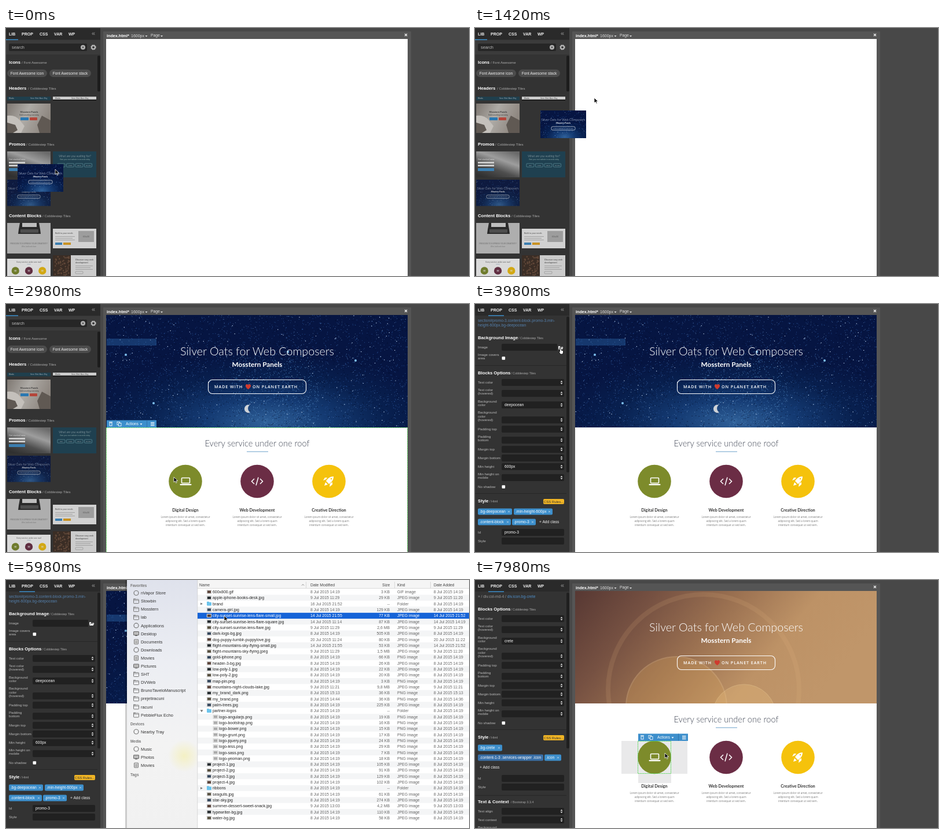
An HTML page that plays this animation: 800 by 430 pixels, repeating every 8000 ms.

```html
<!DOCTYPE html>
<html lang="en">
<head>
<meta charset="utf-8">
<title>Page builder</title>
<style>
html, body { margin: 0; width: 100%; height: 100%; overflow: hidden; background: #484848 }
svg { display: block; font-family: "Liberation Sans", Arial, sans-serif }
text { white-space: pre }
.lato { font-family: Lato, sans-serif }
.open { font-family: "Open Sans", sans-serif }
.b { font-weight: bold }
.l { font-weight: 300 }
.m { text-anchor: middle }
.e { text-anchor: end }
</style>
</head>
<body>
<svg id="stage" width="800" height="430" viewBox="0 0 800 430"></svg>
<script>
// Shape helpers; T takes the vertical middle of the capitals.
const R = (x, y, w, h, f, r = 0, a = '') => `<rect x="${x}" y="${y}" width="${w}" height="${h}" fill="${f}" rx="${r}" ${a}/>`;
const C = (x, y, r, f, a = '') => `<circle cx="${x}" cy="${y}" r="${r}" fill="${f}" ${a}/>`;
const P = (d, f, a = '') => `<path d="${d}" fill="${f}" ${a}/>`;
const L = (d, s, w = 1) => P(d, 'none', `stroke="${s}" stroke-width="${w}"`);
const T = (x, y, s, z, f = '#ddd', c = '', a = '') => `<text x="${x}" y="${y + z * .36}" font-size="${z}" fill="${f}" class="${c}" ${a}>${s}</text>`;
const G = (id, ...parts) => `<g id="${id}">${parts.join('')}</g>`;
const use = (id, x, y, s) => `<use href="#${id}" transform="translate(${x} ${y}) scale(${s})"/>`;
const caret = (x, y, f = '#ddd') => P(`M${x} ${y}h4l-2 2.5z`, f);

let seed = 11;
const rnd = () => (seed = seed * 16807 % 2147483647) / 2147483647;
const stars = (n, x, y, w, h, s) => Array.from({ length: n }, () =>
  `M${(x + rnd() * (w - s)).toFixed(1)} ${(y + rnd() * (h - s)).toFixed(1)}h${s}v${s}h-${s}z`).join('');
const gradient = (id, colors, a = 'x2="1" y2=".3"', kind = 'linear') => `<${kind}Gradient id="${id}" ${a}>` +
  colors.map((c, i) => `<stop offset="${i / (colors.length - 1)}" stop-color="${c}"/>`).join('') + `</${kind}Gradient>`;

const KIT = 'Cobblestep Tiles', BRAND = 'Mosstern Panels', SLOGAN = 'Silver Oats for Web Composers';
const OLIVE = '#7d8b2b', WINE = '#6b2d45', YELLOW = '#f5c20c', BLUE = '#3d8fcc';

const defs = '<defs>' +
  gradient('skyFill', ['#2f6098', '#143a72', '#08204f', '#061542'], 'cx=".53" cy=".95" r=".6"', 'radial') +
  gradient('sunsetFill', ['#573833', '#765142', '#9b7151', '#bd9266', '#c0966a']) +
  gradient('deskFill', ['#8f8780', '#c9c5bf', '#a39a92']) +
  gradient('waterFill', ['#777', '#b5b5b5', '#555', '#303030'], 'x1=".8" x2=".2" y2="1"') +
  gradient('sideFill', ['#dfe2ec', '#eceef3', '#f3f3f3', '#f1f1f1'], 'x2="0" y2="1"') +
  gradient('glowFill', ['#f4f0c4', '#f4f0c400'], '', 'radial') +
  G('starThumb', R(0, 0, 79, 48, 'url(#skyFill)'), P(stars(150, 0, 0, 79, 48, .7), '#2f66b0'), P(stars(35, 0, 0, 79, 48, .7), '#a4c4ea'),
    T(39.5, 16, SLOGAN, 5.6, '#dce8f6', 'lato l m'), T(39.5, 22, BRAND, 3.4, '#fff', 'lato b m'),
    R(19, 28, 41, 6, 'none', 2, 'stroke="#fff" stroke-width=".6"'), T(39.5, 31, 'MADE WITH ♥ ON PLANET EARTH', 2.2, '#fff', 'm')) +
  G('serviceThumb', R(0, 0, 79, 50, '#fff'), T(39.5, 6, 'Every service under one roof', 3.6, '#666', 'lato m'), R(36, 10, 7, .5, '#79b'),
    ...[[15, OLIVE, 'Digital Design'], [39.5, WINE, 'Web Development'], [64, YELLOW, 'Creative Direction']].map(([x, c, s]) =>
      C(x, 22, 7, c) + R(x - 2, 20.5, 4, 3, '#fff8') + T(x, 35, s, 2.4, '#333', 'm') +
      [39, 41.5, 44].map(y => R(x - 8, y, 16, .6, '#aaa')).join(''))) + '</defs>';

const base = R(0, 0, 800, 430, '#484848') + R(168, 6, 532, 424, '#555') + R(0, 0, 163, 430, '#333') + R(0, 0, 163, 20, '#2a2a2a') +
  [['LIB', 5], ['PROP', 27], ['CSS', 58], ['VAR', 83], ['WP', 108]].map(([s, x]) => T(x, 10, s, 7, '#eee', 'b')).join('') + T(148, 9, '«', 11, '#999');
const heading = (y, s, note, x, z = 5.4) => T(5, y - .5, s, 7.7, '#fff', 'b') + T(x, y, '/ ' + note, z, '#aaa');

// Library panel
const pill = (x, w, s) => R(x, 72, w, 13, '#4c4c4c', 6.5) + T(x + w / 2, 78.5, s, 6.6, '#eee', 'm');
const bars = (x, y, n, w, f) => Array.from({ length: n }, (_, i) => R(x, y + i * 3, w - i % 2 * 4, .8, f)).join('');
const thumbs = R(2, 119, 75, 6.5, '#1b4253') + T(5, 122, 'Blocks', 3, '#ddd') + T(42, 122, 'Home  Work  About  Blog', 2.6, '#bcd') +
  R(81, 119, 75, 5, '#eee') + R(81, 124, 75, 1.5, '#111') + T(85, 122, 'Blocks', 3, '#333') + T(113, 122, 'Home  Work  About  Blog', 2.6, '#444') +
  R(2, 131, 75, 51, 'url(#deskFill)') + P('M2 152q14-2 22 8l8 10-6 12H2z', '#e4e0da') + P('M2 164l14 4 4 9-8 5H2zM62 152l15 8v22H58l-4-14z', '#6a625b') +
  T(40, 145, BRAND, 4.2, '#333', 'lato b m') + T(40, 151, 'Build something neat today', 2.8, '#444', 'm') + R(25, 155, 14, 5, '#2788cf', 1) + R(41, 155, 13, 5, '#d2493c', 1) +
  R(2, 214, 75, 45, 'url(#waterFill)') + T(5, 228, 'Get started now', 4, '#fff', 'lato') + R(5, 232, 28, 3, '#eee') + R(5, 237, 28, 3, '#eee') + R(5, 243, 28, 5, BLUE) +
  R(81, 214, 75, 45, '#1b4457') + T(119, 222, 'What are you waiting for?', 5, '#d8e4e8', 'lato l m') + T(119, 228, 'Start your next website in seconds today', 2.9, '#9bb', 'm') +
  ['GET', 'LOOK', 'READ', 'SHARE'].map((s, i) => R(89 + i * 15.5, 235, 13, 6, 'none', 1, 'stroke="#7bb6c4" stroke-width=".6"') + T(95.5 + i * 15.5, 238, s, 2.5, '#fff', 'm')).join('') +
  use('starThumb', 2, 263, .95) +
  R(2, 338, 75, 53, '#c9c9c9') + P('M24 338h33l2 11 1 8H21l1-8z', '#292929') + R(28, 338, 25, 7, '#ddd') + R(25, 349, 31, 6, '#555', 1) +
  T(39.5, 374, 'FREEDOM TO EXPRESS YOUR CREATIVITY', 3.1, '#777', 'm') + T(39.5, 379, 'Write, build and share', 2.6, '#888', 'm') +
  R(81, 348, 75, 34, '#f4f4f4') + T(85, 356, 'Build to your needs', 3.6, '#555', 'lato') + bars(85, 361, 3, 34, '#aaa') + R(85, 372, 12, 4, BLUE) + R(99, 372, 13, 4, '#e9a820') +
  R(125, 352, 27, 19, '#b5b5b5') + T(138.5, 361.5, '600x400', 3, '#666', 'm') +
  use('serviceThumb', 2, 400, .95) +
  R(81, 394, 75, 36, '#eee') + R(81, 394, 31, 36, '#3c2c22') + P(stars(60, 82, 395, 29, 35, 2.2), '#6a4c3a') +
  T(120, 402, 'Discover easy web', 3.8, '#444', 'lato') + T(120, 407, 'development', 3.8, '#444', 'lato') + bars(120, 412, 3, 30, '#aaa') + R(120, 422, 13, 4, 'none', 1, 'stroke="#888" stroke-width=".5"');
const lib = R(0, 19.5, 21, 1.5, BLUE) + R(0, 21, 163, 25, '#3b3b3b') + R(5, 27, 135, 13, '#262626', 2) + T(10, 33, 'search', 7.3, '#bbb') +
  C(133, 33.5, 4, '#b5b5b5') + L('M131.5 32l3 3m0-3l-3 3', '#333') + C(151, 33.5, 3, 'none', 'stroke="#bbb" stroke-width="2"') +
  C(151, 33.5, 4.3, 'none', 'stroke="#bbb" stroke-dasharray="1.7 1.7"') + R(158, 48, 5, 62, '#1c1c1c', 2) +
  heading(60, 'Icons', 'Font Awesome', 27, 6.1) + pill(2, 69, 'Font Awesome icon') + pill(75, 72, 'Font Awesome stack') +
  heading(105, 'Headers', KIT, 38, 6.1) + heading(202, 'Promos', KIT, 35, 6.1) + heading(326, 'Content Blocks', KIT, 63, 6.1) + `<g opacity=".82">${thumbs}</g>`;

// Property panel
const label = (s, y) => s.split('|').reverse().map((w, i) => T(5, y - i * 6.6, w, 6.1, '#bbb')).join('');
const field = (s, y, v = '') => label(s, y) + R(46, y - 6, 108, 12, '#212121', 2) + T(51, y, v, 6.7, '#fff');
const select = (s, y, v) => field(s, y, v) + P(`M147.5 ${y - .8}h4l-2-2.4zM147.5 ${y + .8}h4l-2 2.4z`, '#ddd');
const check = (s, y) => label(s, y) + R(46.5, y - 2.8, 5.6, 5.6, '#fff', 1);
const tag = (x, y, w, s) => R(x, y - 5.5, w, 11, BLUE, 2) + T(x + 3, y, s, 6.7, '#fff') + L(`M${x + w - 7} ${y - 1.5}l3 3m0-3l-3 3`, '#cde', .8);
const rule = y => R(0, y, 158, 1, '#272727');
const folder = (x, y, f) => P(`M${x} ${y - 3}h3l1 1h3.5v1.5h-5l-2 3.5h6l2-3.5h-1M${x} ${y - 3}v6l2.5-4.5h5z`, f);
const options = (d, color, min) => heading(120 + d, 'Blocks Options', KIT, 62) +
  [['Text color', 136], ['Text color|(hovered)', 155], ['Background|color', 175, color], ['Background|color|(hovered)', 201], ['Padding top', 217], ['Padding|bottom', 236],
   ['Margin top', 252], ['Margin bottom', 267], ['Min height', 282, min], ['Min height on|mobile', 301]].map(([s, y, v]) => select(s, y + d, v)).join('') +
  check('No shadow', 317 + d) + rule(328 + d) + heading(342 + d, 'Style', 'Html', 25) + R(118, 338 + d, 36, 9, '#f0b424', 2) + T(136, 342.5 + d, 'CSS Rules...', 6, '#333', 'm');
const panel = (...parts) => R(23, 19.5, 27, 1.5, BLUE) + R(158, 22, 5, 270, '#1f1f1f', 2) + parts.join('');
const promoProps = (d, image) => panel(
  T(5, 29, 'section#promo-3.content-block.promo-3.min-', 6.7, '#5580ad'), T(5, 37, 'height-600px.bg-deepocean', 6.7, '#5580ad'),
  heading(59, 'Background Image', KIT, 75), image, folder(144, 76, '#eee'), check('Image covers|area', 94 + d), rule(106 + d), options(d, 'deepocean', '600px'),
  tag(5, 360 + d, 59, '.bg-deepocean'), tag(67, 360 + d, 67, '.min-height-600px'), tag(5, 378 + d, 57, '.content-block'), tag(64, 378 + d, 41, '.promo-3'),
  T(111, 378 + d, '+ Add class', 6.7, '#eee'), field('Id', 396 + d, 'promo-3'), field('Style', 411 + d));
const iconProps = panel(T(5, 29, '» / div.col-md-4 / <tspan fill="#4f8fca">div.icon.bg-crete</tspan>', 6.7, '#999'), options(-69, 'crete', ''),
  tag(5, 291, 42, '.bg-crete'), R(5, 302.5, 113, 11, '#3a70a8', 2), T(8, 308, '.content-1-3 .services-wrapper .icon', 6.7, '#fff'), tag(120, 308, 29, '.icon'),
  T(8, 325, '+ Add class', 6.7, '#eee'), field('Id', 344), field('Style', 359), rule(373), heading(385, 'Text &amp; Context', 'Bootstrap 3.3.4', 62),
  select('Text align', 401), select('Text context', 416), label('Background', 429));

// Web page
const page = T(174, 13, 'index.html*', 7.2, '#fff', 'b') + T(216, 13, '1600px', 7, '#ddd') + caret(240.5, 13) + T(250, 13, 'Page', 6.8, '#ddd') + caret(267, 13) +
  L('M689 10l4 4m0-4l-4 4', '#eee', 1.3) + R(173, 19, 521, 411, '#fff');
const copy = T(434, 82, SLOGAN, 19.7, '#fff', 'lato l m') + T(434, 105, BRAND, 11.8, '#fff', 'lato b m') +
  R(349.5, 131.5, 169, 24, 'none', 7, 'stroke="#fff" stroke-width="1.1"') +
  T(360, 143.5, 'MADE WITH', 7.2, '#fff', 'open', 'font-weight="600" letter-spacing=".9"') + T(426, 143.5, 'ON PLANET EARTH', 7.2, '#fff', 'open', 'font-weight="600" letter-spacing=".9"') +
  P('M418.5 148c-7-5-4.5-9-2-9q1.5 0 2 1.5q.5-1.5 2-1.5c2.5 0 5 4-2 9z', '#cf3a2e');
const sky = R(173, 19, 521, 195, 'url(#skyFill)') + P(stars(1500, 173, 19, 521, 195, 1.3), '#030c2c', 'opacity=".6"') +
  P(stars(2200, 173, 19, 521, 195, .9), '#28549a') + P(stars(500, 390, 90, 150, 124, 1), '#4f86bd') +
  P(stars(650, 173, 19, 521, 195, .8), '#6f98cb') + P(stars(130, 173, 19, 521, 195, 1.2), '#c3daf4') +
  [[604, 98], [207, 88], [487, 83], [255, 172]].map(([x, y]) => C(x, y, 2, '#7fc0f0')).join('') +
  P('M421 175a7 7 0 1 0 1 13a8 8 0 0 1-1-13z', '#cfd3d8') + R(174, 60, 86, 12, '#2f6bb0', 0, 'opacity=".4"') + copy;
const sunset = R(173, 19, 521, 195, 'url(#sunsetFill)') + '<clipPath id="heroBox">' + R(173, 19, 521, 195, '#000') + '</clipPath><g clip-path="url(#heroBox)">' +
  C(395, 190, 165, 'none', 'stroke="#e3b880" stroke-width="8" opacity=".13"') + C(348, 220, 87, '#d5a25c', 'opacity=".3" stroke="#f0c890" stroke-width="2"') +
  C(465, 236, 55, '#e3b87c', 'opacity=".4" stroke="#f4d8a0"') + '</g>' + copy;
const service = (x, f, title, icon) => C(x, 307.5, 28.8, f) + icon + T(x, 357, title, 7.3, '#333', 'lato b m') +
  ['Lorem ipsum dolor sit amet, consectetur', 'adipiscing elit. Sed a lorem quam', 'interdum consequat ut sed sem.'].map((s, i) => T(x, 369.5 + i * 7, s, 4.5, '#777', 'open m')).join('');
const services = T(434, 242, 'Every service under one roof', 14.6, '#444a58', 'lato l m') + R(416, 255.5, 37, 1, '#6a9fca') +
  service(310, OLIVE, 'Digital Design', R(303.5, 301.5, 14, 9, 'none', 1, 'stroke="#fff" stroke-width="1.6"') + R(300.5, 312, 20, 2.2, '#fff', 1)) +
  service(434, WINE, 'Web Development', L('M429 303l-4.5 4.5 4.5 4.5M439 303l4.5 4.5-4.5 4.5M436 300.5l-4 14', '#fff', 1.5)) +
  service(558, YELLOW, 'Creative Direction', P('M566 299c-6 0-10 3-13 8l5 5c5-3 8-7 8-13zM553 304l-5 2 3-5h4zM560 311l-1 6 5-4v-4zM552 309l4 4-6 2z', '#fff') + C(562, 303, 1.2, YELLOW));

// Selection chrome
const outline = (x, y, w, h) => R(x + .5, y + .5, w - 1, h - 1, 'none', 0, 'stroke="#55d855" stroke-dasharray="2 1"');
const toolbar = (x, y) => R(x, y, 86, 12.5, BLUE) + R(x + 5, y + 4.5, 4, 5, 'none', 0, 'stroke="#fff" stroke-width=".9"') + R(x + 4, y + 2.8, 6, 1, '#fff') +
  R(x + 18, y + 3, 4.5, 5, 'none', 0, 'stroke="#fff" stroke-width=".8"') + R(x + 20.5, y + 5, 4.5, 5, BLUE, 0, 'stroke="#fff" stroke-width=".8"') +
  T(x + 33, y + 6.3, 'Actions', 6.7, '#fff') + caret(x + 57.5, y + 5.8, '#fff') + R(x + 69, y, .8, 12.5, '#2b6fa5') + [3.5, 6, 8.5].map(d => R(x + 76, y + d, 6.5, 1.2, '#fff')).join('');
const padding = R(174, 19, 520, 46, '#2c4a10', 0, 'opacity=".38"') + R(174, 170, 520, 44, '#4a6a18', 0, 'opacity=".3"') +
  R(586, 214, 108, 9, '#c9c9c9') + T(588, 218.5, 'section#promo-3.content-bloc...', 7.1, '#333');

// File dialog: name;size;modified;added, dates as "day time" in July
const files = `600x800.gif;3 KB
apple-iphone-books-desk.jpg;29 KB;9 11:29;9 11:20
+brand;--;16 21:52
camera-girl.jpg;129 KB
city-sunset-sunrise-lens-flare-small.jpg;77 KB;14 21:55;14 21:52
city-sunset-sunrise-lens-flare-square.jpg;87 KB;14 11:14;14 14:19
city-sunset-sunrise-lens-flare.jpg;2,6 MB;9 11:29;9 11:29
dark-logs-bg.jpg;505 KB
dog-puppy-tumblr-puppylove.jpg;80 KB;20 11:24;20 11:22
flight-mountains-sky-flying-small.jpg;53 KB;14 21:55;14 21:52
flight-mountains-sky-flying.jpeg;1,5 MB;9 11:29;9 11:20
gold-iphone.png;66 KB
header-3-bg.jpg;26 KB
low-poly-1.jpg;22 KB
low-poly-2.jpg;20 KB
map-pin.png;3 KB
mountains-night-clouds-lake.jpg;9,8 MB;9 11:21;9 11:21
my_brand_dark.png;36 KB;8 15:13;8 15:13
my_brand.png;36 KB;8 14:44;8 14:36
palm-trees.jpg;225 KB
-partner-logos;--
logo-angularjs.png;19 KB
logo-bootstrap.png;16 KB
logo-bower.png;15 KB
logo-grunt.png;17 KB
logo-jquery.png;24 KB
logo-less.png;29 KB
logo-sass.png;7 KB
logo-yeoman.png;18 KB
project-1.jpg;105 KB
project-2.jpg;91 KB
project-3.jpg;129 KB
project-4.jpg;102 KB
+ribbons;--
seagulls.jpg;61 KB
star-sky.jpg;274 KB
summer-dessert-sweet-snack.jpg;4,2 MB;9 13:03;9 13:03
typewriter-bg.jpg;110 KB
water-bg.jpg;58 KB`.split('\n');
const date = s => s.replace(' ', ' Jul 2015 ');
const fileRow = (i, f) => {
  const [raw, size, mod = '8 14:19', added = '8 14:19'] = files[i].split(';');
  const y = 20.5 + i * 10.316, dir = size == '--', name = raw.replace(/^[+-]/, ''), x = name.startsWith('logo-') ? 368 : 357;
  const kind = dir ? 'Folder' : { gif: 'GIF', png: 'PNG' }[name.split('.')[1]] || 'JPEG';
  const icon = dir ? R(347, y - 3.5, 4, 2, '#55b4e0') + R(347, y - 2.7, 8, 6, '#6cc4ec', 1) + P(raw[0] == '+' ? `M336 ${y - 2}l4 2-4 2z` : `M335.5 ${y - 1.5}h5l-2.5 4z`, '#777')
    : R(x - 10, y - 3, 8, 6.2, x > 360 ? '#eee' : '#ddd', 0, 'stroke="#aaa" stroke-width=".4"') + R(x - 9, y - 2, 6, 4.2, x > 360 ? '#aaa' : ['#5a4238', '#33465c', '#57503f', '#262c30'][i * 7 % 4]);
  const g = f || '#666';
  return icon + T(x, y, name, 6.95, f || '#222') + T(526, y, date(mod), 6.9, g) + T(663, y, size, 6.9, g, 'e') +
    T(676, y, dir ? kind : kind + ' image', 6.9, g) + T(739, y, date(added), 6.9, g);
};
const glyphs = {
  f: y => R(220.5, y - 3, 9, 7, 'none', .8, 'stroke="#777" stroke-width="1"') + R(220, y - 4.2, 4, 1.5, '#777') + R(221, y - 1.5, 8, 1, '#999'),
  c: y => C(225, y, 4, 'none', 'stroke="#777" stroke-width="1.2"'),
  w: y => R(220.5, y - 3.5, 9, 6, '#bbb', .5, 'stroke="#666"') + R(223, y + 3, 4, 1, '#666'),
  d: y => R(221.5, y - 4, 7, 8, '#ddd', .5, 'stroke="#777"') + R(223, y - 1.5, 4, 1, '#777') + R(223, y + 1, 4, 1, '#777')
};
const group = (y0, list) => list.split(',').map((s, i) => glyphs[s[0]](y0 + i * 14.1) + T(233, y0 + i * 14.1, s.slice(1), 7.4, '#333')).join('');
const finder = R(206, 0, 3, 430, '#0003') + R(209, 0, 122, 430, 'url(#sideFill)') + C(308, 305, 28, 'url(#glowFill)') + R(331, 0, 469, 430, '#fff') +
  files.map((_, i) => i % 2 ? R(331, 15.3 + i * 10.316, 469, 10.3, '#f4f5f6') : '').join('') + R(331, 0, 469, 14, '#f5f5f5') + R(331, 14, 469, .7, '#ccc') + R(330.5, 0, .7, 430, '#ccc') +
  [518, 671, 733].map(x => R(x, 3, .7, 11, '#ccc')).join('') + [['Name', 334], ['Date Modified', 526], ['Size', 650], ['Kind', 676], ['Date Added', 739]].map(([s, x]) => T(x, 8.5, s, 6.8, '#444')).join('') +
  L('M511 9.5l2-2 2 2', '#888') + [['Favorites', 10], ['Devices', 250], ['Media', 280], ['Tags', 338]].map(([s, y]) => T(215, y, s, 6.4, '#777', 'b')).join('') +
  group(22.5, 'cnVapor Store,fStowbin,fMosstern,flab,cApplications,wDesktop,dDocuments,cDownloads,dMovies,wPictures,fSHT,fDVWeb,fBrunoTaveloManuscript,fprejetiracuni,fracuni,fPebbleFlux Echo') +
  group(263, 'cNearby Tray') + group(293, 'cMusic,wPhotos,dMovies') + files.map((_, i) => fileRow(i)).join('');

document.getElementById('stage').innerHTML = defs + base +
  G('lib', lib) + G('props', promoProps(0, field('Image', 75) + R(142, 69, 12, 12, '#333'))) +
  G('propsImage', promoProps(12, label('Image', 75) + R(4, 81.5, 141, 12, '#212121', 2) + T(6, 87.5, 'images/city-sunset-sunrise-lens-flare-small.', 6.7, '#fff'))) +
  G('propsIcon', iconProps) + page + G('sky', sky) + G('sunset', sunset) + G('padding', padding) +
  G('iconBack', R(253, 279, 114, 57, '#e9e9ea') + R(282, 336, 57, 16, '#e9e9ea')) + G('services', services) +
  G('heroMark', outline(173, 19, 521, 195), toolbar(174, 59.5)) + G('servicesMark', outline(173, 214, 521, 217), toolbar(174, 201.5)) +
  G('iconMark', outline(281, 279, 58, 57), toolbar(282, 266.5)) +
  G('finder', finder) + G('picked', R(331, 56.8, 469, 10.3, '#1664d8') + fileRow(4, '#fff')) +
  G('dragHero', use('starThumb', 0, 0, 1)) + G('dragServices', use('serviceThumb', 0, 0, 1)) +
  G('arrow', P('M0 0v9l2.2-2 1.5 3.3 1.5-.7-1.5-3.1h3z', '#000', 'stroke="#fff" stroke-width=".8"')) +
  G('hand', P('M146.5 77q1-1 2 0l.5 3 3.5 1v3l-1 3h-4l-2.5-4 1.5-.5z', '#fff', 'stroke="#000" stroke-width=".8"'));

const el = id => document.getElementById(id);
const show = (id, on) => el(id).style.display = on ? '' : 'none';
const move = (id, x, y) => el(id).setAttribute('transform', `translate(${x} ${y})`);

function draw(t) {
  const within = (a, b) => t >= a && t < b;
  const ticks = a => Math.floor((t - a) / 70);
  const p = Math.max(0, ticks(1000) + 1) / 7, k = ticks(2560);

  show('lib', t < 3980);
  show('props', within(3980, 6980));
  show('propsImage', within(6980, 7980));
  show('propsIcon', t >= 7980);
  show('sky', within(1560, 6980));
  show('sunset', t >= 6980);
  show('padding', within(6980, 7980));
  show('heroMark', within(1560, 2560) || within(6980, 7980));
  show('services', t >= 2980);
  show('servicesMark', within(2980, 3980));
  show('iconBack', t >= 7980);
  show('iconMark', t >= 7980);
  show('finder', within(4980, 6980));
  show('picked', within(5980, 6980));
  show('dragHero', t < 1560);
  show('dragServices', within(2560, 2980));
  show('hand', within(3980, 4980));
  show('arrow', !within(3980, 4980));

  move('dragHero', 20 + 93 * p, 236 - 93 * p);
  move('dragServices', 17 + 34 * k, 374 - 14 * k);
  move('arrow', ...t < 1560 ? [85 + 121 * p, 245 - 124 * p] : t < 2560 ? [265, 140] : t < 2980 ? [49 + 36 * k, 391 - 14 * k]
    : t < 3980 ? [290, 300] : t < 5980 ? [440, 235] : t < 7980 ? [377, 62] : [328, 300]);
}
const start = performance.now();
(function loop() {
  draw((performance.now() - start) % 8000);
  requestAnimationFrame(loop);
})();
</script>
</body>
</html>
```
